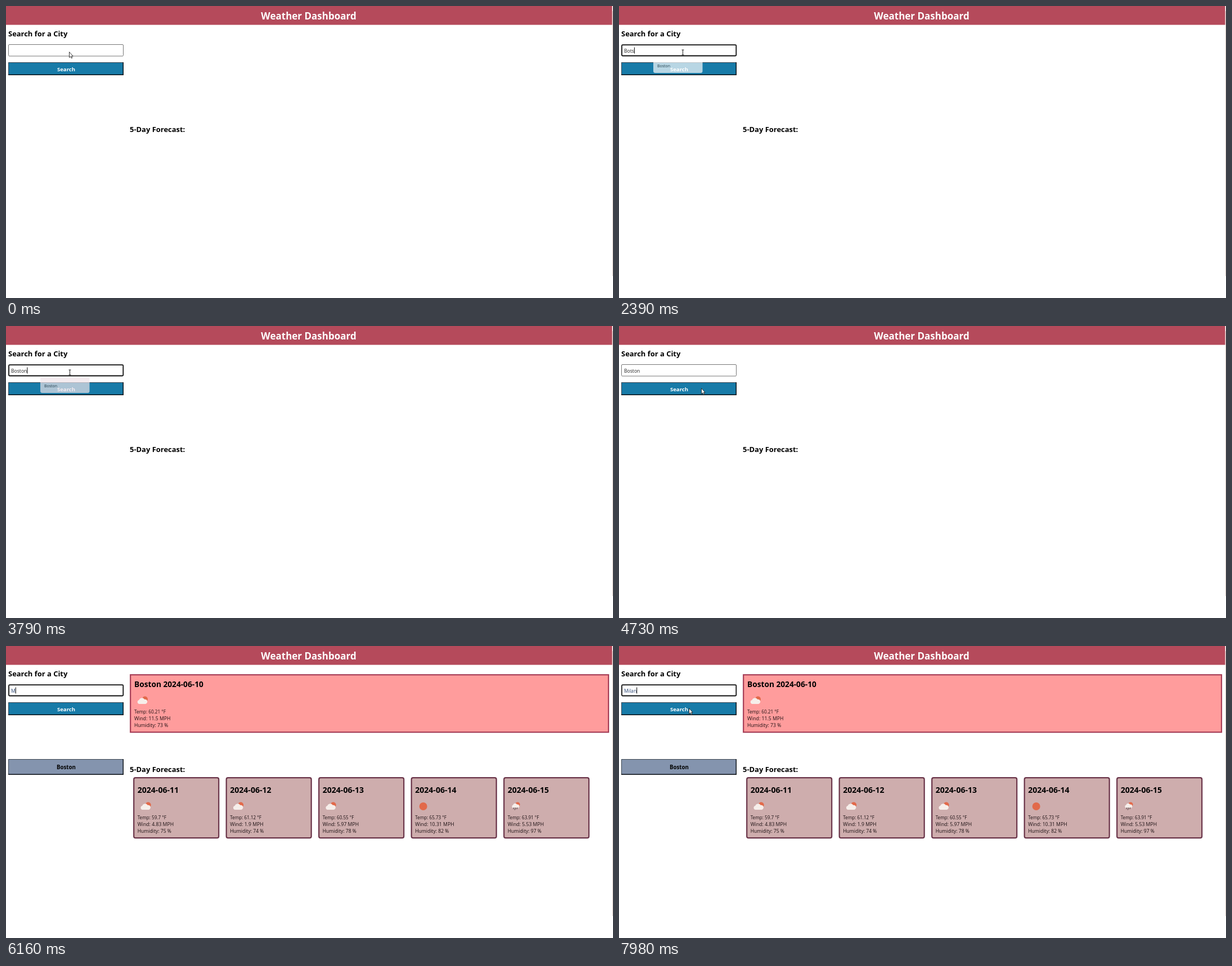
These frames come from a looping animation (1079x519 px, 8000 ms). An HTML page:

```html
<!DOCTYPE html>
<html lang="en">
<head>
<meta charset="utf-8">
<title>Weather Dashboard</title>
<style>
html, body { margin: 0; width: 100%; height: 100%; overflow: hidden; background: #fff; }
svg { display: block; width: 1079px; height: 519px; font-family: "Open Sans", "Noto Sans", sans-serif; }
.b { font-weight: 700; }
.mid { text-anchor: middle; }
</style>
</head>
<body>
<svg id="stage" viewBox="0 0 1079 519"></svg>
<script>
const LOOP = 8000;
const text = (x, y, size, s, cls = '', fill = '#000') =>
  `<text x="${x}" y="${y}" font-size="${size}" class="${cls}" fill="${fill}">${s}</text>`;
const rect = (x, y, w, h, fill, extra = '') =>
  `<rect x="${x}" y="${y}" width="${w}" height="${h}" fill="${fill}" ${extra}/>`;
const circle = (x, y, r, fill) => `<circle cx="${x}" cy="${y}" r="${r}" fill="${fill}"/>`;

// Button with an outset border: light top and left, dark bottom and right
const button = (y, h, fill, label, size, color) =>
  rect(4, y, 205, h, fill) +
  `<path d="M4.5 ${y + h}V${y + .5}H209" fill="none" stroke="#3c4650"/>` +
  `<path d="M4 ${y + h - .7}H208.3V${y}" fill="none" stroke="#0a0f14" stroke-width="1.4"/>` +
  text(107, y + h / 2 + 4, size, label, 'b mid', color);

const SUN = '#e2694a', CLOUD = '#f6eeea';
const cloud = (x, y, k) =>
  `<path transform="translate(${x} ${y}) scale(${k})" fill="${CLOUD}"
    d="M-6 6A3.6 3.6 0 0 1 -6 -1A5.3 5.3 0 0 1 3.5 -2.2A4.2 4.2 0 0 1 5.5 6Z"/>`;
const icons = {
  cloudy: (x, y) => circle(x + 4.5, y - 2.5, 5, SUN) + cloud(x, y, 1),
  sunny: (x, y) => circle(x, y, 7, SUN),
  rainy: (x, y) => circle(x + 3.2, y - 3.4, 4.2, SUN) + cloud(x - .3, y - 1.7, .75) +
    `<path d="M${x - 3} ${y + 2}l-1.5 3M${x} ${y + 2}l-2 4.5M${x + 3} ${y + 2}l-1.5 3" stroke="#5a4a4c" stroke-width="1.1"/>`
};

// Title, icon and three readings; y is the title's baseline
const report = (x, y, title, size, icon, gap, [temp, wind, humidity]) =>
  text(x, y, size, title, 'b') + icons[icon](x + 14.5, y + gap - 23) +
  text(x, y + gap, 8.15, `Temp: ${temp} °F`, '', '#1c1013') +
  text(x, y + gap + 12, 8.7, `Wind: ${wind} MPH`, '', '#1c1013') +
  text(x, y + gap + 24, 8.6, `Humidity: ${humidity} %`, '', '#1c1013');

const days = [
  ['cloudy', 59.7, 4.83, 75], ['cloudy', 61.12, 1.9, 74], ['cloudy', 60.55, 5.97, 78],
  ['sunny', 65.73, 10.31, 82], ['rainy', 63.91, 5.53, 97]
];
const forecast = days.map(([icon, ...data], i) => {
  const x = 226 + 164.5 * i;
  return rect(x + 1.2, 234.2, 151, 107, '#ceadad', 'rx="3" stroke="#6a3449" stroke-width="2.2"') +
    report(x + 7.7, 261, `2024-06-${11 + i}`, 14.1, icon, 47, data);
}).join('');

const stage = document.getElementById('stage');
stage.innerHTML =
  rect(0, 0, 1077.5, 33.5, '#b54a5b') +
  rect(1078, 9, 1, 471, '#dccdc6') +
  text(538, 24, 17, 'Weather Dashboard', 'b mid', '#fff') +
  text(4, 54, 12.95, 'Search for a City', 'b') +
  text(220, 224, 12.95, '5-Day Forecast:', 'b') +
  rect(4.5, 68.5, 204, 20.5, '#fff', 'id="box"') +
  rect(9, 73, 28.5, 12, '#1a73d0', 'id="mark"') +
  text(9, 83, 8.6, '', '', '#222').replace('<text', '<text id="value"') +
  rect(0, 73.5, 1, 11, '#000', 'id="caret"') +
  button(100, 23, '#177ba8', 'Search', 9.6, '#fff') +
  '<g id="results">' +
    button(201, 28, '#8494ae', 'Boston', 9.7, '#000') +
    rect(221.2, 51.2, 849.8, 102, '#ff9c9c', 'stroke="#a63e57" stroke-width="2.2"') +
    report(228, 73, 'Boston 2024-06-10', 13.7, 'cloudy', 47, [60.21, 11.5, 73]) +
    forecast +
  '</g><g id="popup"></g>' +
  `<path id="arrow" d="M0 0V10L2.3 7.9L3.8 11.2L5.3 10.5L3.9 7.4H6.6Z" fill="#fff" stroke="#222" stroke-width=".9"/>
   <path id="beam" d="M-2 -4.5H2M0 -4.5V4.5M-2 4.5H2" fill="none" stroke="#222"/>`;

const el = id => document.getElementById(id);
const [box, mark, value, caret, results, popup, arrow, beam] =
  ['box', 'mark', 'value', 'caret', 'results', 'popup', 'arrow', 'beam'].map(el);
const show = (node, on) => node.setAttribute('visibility', on ? 'visible' : 'hidden');

const typed = [
  [0, ''], [1500, 'B'], [2030, 'Bo'], [2390, 'Bots'], [3000, 'Bot'], [3180, 'Bo'],
  [3360, 'Bos'], [3510, 'Bost'], [3660, 'Bosto'], [3790, 'Boston'],
  [6160, 'M'], [6420, 'Mi'], [6540, 'Mil'], [6690, 'Mila'], [6840, 'Milan']
];
const cities = ['Boston', 'Berlin', 'Milan', 'Miami', 'Madrid', 'Munich'];
// Suggestion lists: start, end, prefix, fade-out time, colour
const lists = [
  [480, 1500, '', 0], [1500, 2060, 'B', 0], [2060, 2390, 'Bo', 150], [3180, 3790, 'Bo', 150, '#f0e4ea'],
  [6360, 6420, 'M', 0], [6420, 6540, 'Mi', 0], [6540, 6840, 'Mil', 150]
];
const path = [
  [0, 113, 82], [4240, 113, 82], [4620, 147, 111], [4980, 147, 111], [5340, 150, 79],
  [5660, 150, 79], [7590, 152, 68], [7950, 125, 111], [LOOP, 125, 111]
];

function pointer(t) {
  const i = path.findIndex(p => p[0] > t);
  const [t0, x0, y0] = path[i - 1], [t1, x1, y1] = path[i];
  const p = (t - t0) / (t1 - t0), e = p * p * (3 - 2 * p);
  return [x0 + (x1 - x0) * e, y0 + (y1 - y0) * e];
}

function drawPopup(t) {
  const list = lists.find(([a, b, , fade]) => t >= a && t < b + fade);
  show(popup, list);
  if (!list) return;
  const [, end, prefix, fade, color = '#fff'] = list;
  const names = cities.filter(c => c.startsWith(prefix));
  popup.setAttribute('opacity', t < end ? 1 : .7 * (1 - (t - end) / fade));
  popup.innerHTML =
    rect(61, 91, 87.5, 7.7 + 20.3 * names.length, t < end ? '#fff' : color, 'rx="3.5"') +
    (t < end ? rect(60.8, 90.8, 88, 8 + 20.3 * names.length, 'none', 'rx="3.5" stroke="#0002" stroke-width=".8"') : '') +
    names.map((c, i) => text(68, 109.3 + 20.3 * i, 7, c, '', '#222')).join('');
}

function draw(t) {
  const focus = t >= 60 && t < 4700 || t >= 5420;
  const selected = t >= 5560 && t < 6160;
  const s = typed.findLast(k => k[0] <= t)[1];

  const attrs = focus
    ? { x: 5, y: 69.2, width: 203.3, height: 19.3, rx: 1.5, stroke: '#101010', 'stroke-width': 1.8 }
    : { x: 4.5, y: 68.5, width: 204, height: 20.5, rx: 1.5, stroke: '#767676', 'stroke-width': 1 };
  for (const k in attrs) box.setAttribute(k, attrs[k]);

  value.textContent = s;
  value.setAttribute('fill', selected ? '#fff' : t >= 6160 ? '#2b4674' : '#222');
  show(mark, selected);
  caret.setAttribute('x', 9 + (s ? value.getComputedTextLength() : 0));
  show(caret, focus && !selected && !(t >= 840 && t < 1340));
  show(results, t >= 4890);
  drawPopup(t);

  const [x, y] = pointer(t);
  const visible = t < 6160 || t >= 7590;
  const overInput = t >= 60 && y > 68 && y < 89;
  arrow.setAttribute('transform', `translate(${x - .5} ${y - .3})`);
  beam.setAttribute('transform', `translate(${x + .5} ${y + .5})`);
  show(arrow, visible && !overInput);
  show(beam, visible && overInput);
}

const start = performance.now();
function tick() {
  draw((performance.now() - start) % LOOP);
  requestAnimationFrame(tick);
}
tick();
</script>
</body>
</html>
```
